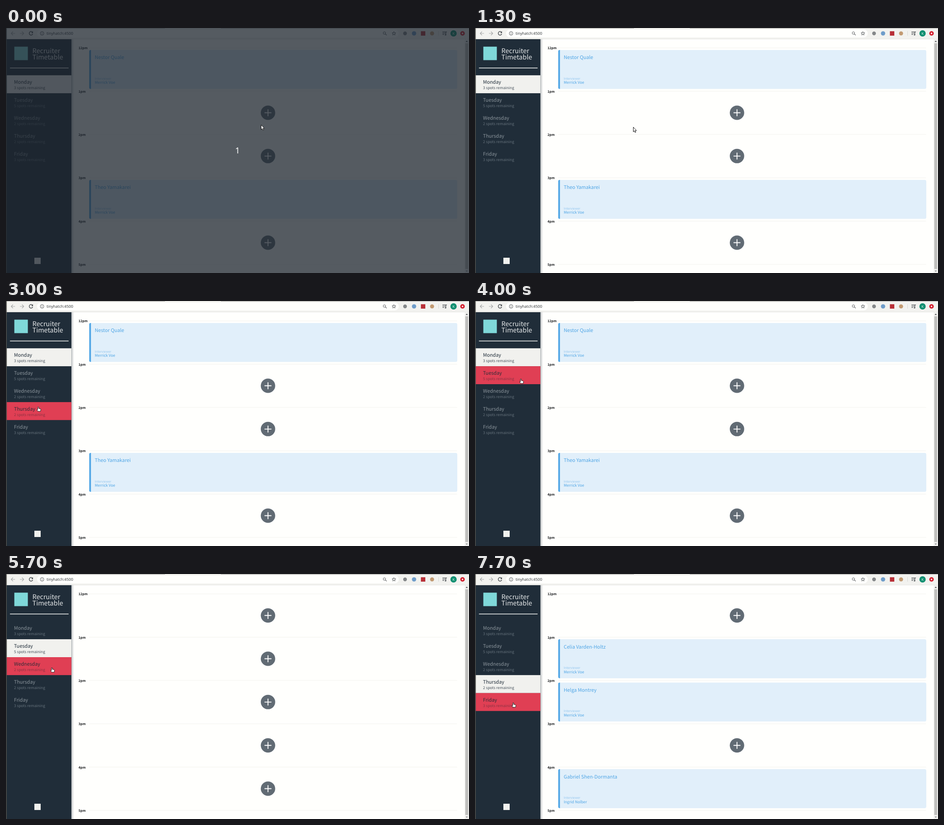
Animation of 1028x545 px, one loop 8000 ms. Source, as an HTML page:

```html
<!DOCTYPE html>
<html lang="en">
<head>
<meta charset="utf-8">
<title>Timetable</title>
<style>
html, body { margin: 0; width: 100%; height: 100%; overflow: hidden; background: #fffffd; }
svg { display: block; width: 100vw; height: 100vh; }
text { font-family: "Noto Sans CJK JP", "Noto Sans CJK SC", "Noto Sans CJK", "Noto Sans", sans-serif; text-rendering: geometricPrecision; white-space: pre; }
.bar { font-family: "Noto Sans", "Open Sans", sans-serif; }
</style>
</head>
<body>
<svg id="stage" viewBox="0 0 1028 545" xmlns="http://www.w3.org/2000/svg"></svg>
<script>
const NS = "http://www.w3.org/2000/svg";
const stage = document.getElementById("stage");
const LOOP = 8000;
const STEP = 100;
// Latin letters in the CJK face are drawn about 12 % larger per em.
const EM = 1 / 1.117;

function add(parent, tag, attrs, content) {
  const node = document.createElementNS(NS, tag);
  for (const key in attrs) node.setAttribute(key, attrs[key]);
  if (content !== undefined) node.textContent = content;
  parent.appendChild(node);
  return node;
}
const group = (parent, attrs = {}) => add(parent, "g", attrs);
const rect = (parent, x, y, width, height, fill, rx = 0) =>
  add(parent, "rect", { x, y, width, height, fill, rx });
const circle = (parent, cx, cy, r, fill) => add(parent, "circle", { cx, cy, r, fill });
const line = (parent, d, stroke, width = 1) =>
  add(parent, "path", { d, stroke, "stroke-width": width, fill: "none" });
const label = (parent, x, y, size, fill, content, weight = 400) =>
  add(parent, "text", { x, y, fill, "font-size": (size * EM).toFixed(2), "font-weight": weight }, content);

const HOUR = 96.33;
const ROW = 39.9;
const SIDE = 145;
const rowTop = i => 105.2 + i * ROW;
const hourY = i => 44.2 + i * HOUR;

const days = [
  ["Monday", 3], ["Tuesday", 5], ["Wednesday", 2], ["Thursday", 2], ["Friday", 3]
];
const bookings = [
  { 0: ["Nestor Quale", "Merrick Voe"], 3: ["Theo Yamakarei", "Merrick Voe"] },
  {},
  { 2: ["Tobin Dargen", "Marabeth Corvin"], 3: ["Auberon Tillers", "Marabeth Corvin"], 4: ["Elio Mardonez", "Arno Delph"] },
  { 1: ["Celia Varden-Holtz", "Merrick Voe"], 2: ["Helga Montrey", "Merrick Voe"], 4: ["Gabriel Shen-Dormanta", "Ingrid Nolber"] }
];

// start time, selected day
const picks = [[0, 0], [4200, 1], [5900, 2], [7100, 3]];

// first step, last step, pointer x and y reached at the last step
const moves = [
  [0, 0, 566, 215], [300, 300, 551, 219], [400, 600, 499, 225],
  [1200, 1200, 120, 200], [1300, 1300, 351, 220],
  [1500, 1500, 124, 206], [1600, 1800, 70, 125],
  [2000, 2200, 60, 181], [2300, 2600, 62, 258], [2800, 2800, 66, 286],
  [3000, 3100, 77, 184], [3300, 3300, 98, 150],
  [3500, 3500, 231, 168], [3600, 3800, 102, 173],
  [4600, 4700, 103, 179], [4900, 5000, 139, 185.6],
  [5200, 5200, 138, 188], [5400, 5700, 102, 208],
  [6000, 6300, 92, 248], [7500, 7700, 85, 286]
];

function pointerAt(t) {
  const now = Math.floor(t / STEP) * STEP;
  let x = 0, y = 0;
  for (const [from, to, endX, endY] of moves) {
    if (now < from) break;
    const p = (Math.min(now, to) - from + STEP) / (to - from + STEP);
    x += (endX - x) * p;
    y += (endY - y) * p;
  }
  return [x, y];
}

function toolbar(g) {
  rect(g, 0, 0, 1028, 24.5, "#f2f2ef");
  rect(g, 0, 0, 1028, 1, "#a3a39f");
  rect(g, 353, 0, 124, 1.2, "#e9e9e6");
  rect(g, 69, 3, 803, 18, "#fffffd", 9);
  rect(g, 0, 24, 1028, .7, "#dcdcd8");
  line(g, "M20 12h-8.5m4-4l-4 4l4 4", "#a5a7a8", 1.2);
  line(g, "M31 12h8.5m-4-4l4 4l-4 4", "#a5a7a8", 1.2);
  line(g, "M58.6 9.2A4 4 0 1 0 59.4 13", "#43474b", 1.4);
  add(g, "path", { d: "M60 7.2v4h-4z", fill: "#43474b" });
  const info = circle(g, 80.1, 12, 4, "none");
  info.setAttribute("stroke", "#56595c");
  line(g, "M80.1 11.4v2.8m0-4.7v1", "#56595c");
  add(g, "text", { x: 90, y: 15.1, "font-size": 8.5, fill: "#34383c", class: "bar" }, "tinyhatch:4500");
  const lens = circle(g, 840.2, 11.2, 2.7, "none");
  lens.setAttribute("stroke", "#55585c");
  line(g, "M842.2 13.2l3 3", "#55585c", 1.2);
  let star = "";
  for (let i = 0; i < 10; i++) {
    const r = i % 2 ? 1.9 : 4.3, a = (i / 5 - .5) * Math.PI;
    star += (i ? "L" : "M") + (861.3 + r * Math.cos(a)).toFixed(2) + " " + (12.2 + r * Math.sin(a)).toFixed(2);
  }
  line(g, star + "Z", "#4b4f53");
  circle(g, 886, 12, 4.2, "#85888a");
  circle(g, 906, 12, 4.8, "#6f9dca");
  rect(g, 921.2, 7.2, 9.8, 9.8, "#b83038");
  circle(g, 946, 12, 4.5, "#c29a72");
  rect(g, 960, 7, .8, 10, "#cfcfcc");
  line(g, "M969 8.7h7m-7 2.8h7m-7 2.8h4m3.6.7v-6.3h2.4", "#4b4f53", 1.2);
  circle(g, 976, 15, 1.6, "#4b4f53");
  circle(g, 993.7, 12, 7, "#0f8f71");
  add(g, "text", { x: 993.7, y: 14.7, "font-size": 7.4, fill: "#eefaf5", "text-anchor": "middle", class: "bar" }, "K");
  circle(g, 1013.6, 12, 5, "#d3202f");
  circle(g, 1013.6, 12, 1.7, "#fff");
}

function scrollbar(g) {
  rect(g, 1018.5, 24.5, 9.5, 521, "#f0f0ee");
  rect(g, 1019.8, 34, 6.4, 502, "#bfbfbd");
  add(g, "path", { d: "M1020.6 31l2.4-3l2.4 3z", fill: "#55585a" });
  add(g, "path", { d: "M1020.6 539.5l2.4 3l2.4-3z", fill: "#8c8e8f" });
}

function card(parent, y, [guest, host]) {
  const g = group(parent, { "clip-path": "url(#round)", transform: `translate(184.6 ${y + 4.5})` });
  rect(g, 0, 0, 817.4, 87, "#e1effa");
  rect(g, 0, 0, 4, 87, "#4ea5e5");
  label(g, 12.4, 20.5, 12.06, "#4ea5e5", guest);
  label(g, 12.4, 66, 7.7, "#93c6ee", "Interviewer");
  label(g, 12.4, 75.6, 9.38, "#4ea5e5", host);
}

function plus(parent, y) {
  const g = group(parent, { transform: `translate(581.7 ${y + 48})` });
  circle(g, 0, 0, 16, "#616b74");
  line(g, "M-7.7 0h15.4M0-7.7v15.4", "#fff", 1.9);
}

const defs = add(stage, "defs", {});
rect(add(defs, "clipPath", { id: "round" }), 0, 0, 817.4, 87, "#000", 4);
const fade = add(defs, "linearGradient", { id: "fade" });
add(fade, "stop", { offset: 0, "stop-color": "#202d39", "stop-opacity": .28 });
add(fade, "stop", { offset: 1, "stop-color": "#202d39", "stop-opacity": 0 });

rect(stage, 0, 0, 1028, 545, "#fffffd");
for (let i = 0; i < 6; i++) {
  label(stage, 161, hourY(i) + 3.2, 8.1, "#17191b", (i || 12) + "pm", 700);
  rect(stage, 184.5, hourY(i) - .4, 817, .8, "#eeeeea");
}
const pages = bookings.map(list => {
  const page = group(stage);
  for (let i = 0; i < 5; i++) list[i] ? card(page, hourY(i), list[i]) : plus(page, hourY(i));
  return page;
});

rect(stage, SIDE, 24.5, 6, 521, "url(#fade)");
rect(stage, 0, 24.5, SIDE + .2, 521, "#202d39");
rect(stage, 18.5, 41.5, 30, 30, "#7fd8d9");
label(stage, 58.5, 56, 16.2, "#e6e9ea", "Recruiter", 300);
label(stage, 58.5, 69.8, 16.2, "#e6e9ea", "Timetable", 300);
rect(stage, 8.8, 88.2, 130.2, 1.5, "#f4f5f3");
rect(stage, 63, 511, 14, 14, "#f1f1ee");

const rows = days.map(([name, spots], i) => {
  const y = rowTop(i);
  return {
    back: rect(stage, 1.5, y, 143.7, ROW, "none"),
    name: label(stage, 17.7, y + 19.2, 12.06, "#000", name),
    spots: label(stage, 17.7, y + 30.8, 9.38, "#000", spots + " spots remaining", 300)
  };
});
const looks = {
  plain: ["none", "#8b959c", "#66727c"],
  hover: ["#e03f54", "#302c38", "#8c3344"],
  picked: ["#f1f1ee", "#202d39", "#46505a"]
};

toolbar(stage);
scrollbar(stage);
rect(stage, 0, 0, 1.6, 545, "#4d4c48");

const veil = group(stage);
rect(veil, 0, 0, 1028, 545, "rgba(29,37,46,.75)");
add(veil, "text", { x: 514, y: 279.3, "font-size": 18.5, fill: "#fff", "text-anchor": "middle", class: "bar" }, "1");

const shape = { stroke: "#111", fill: "#fff", "stroke-linejoin": "round" };
const arrow = add(stage, "path", {
  ...shape, d: "M.5.5V11l2.3-2.2l1.6 3.7l1.7-.8l-1.6-3.5h3.1z"
});
const hand = add(stage, "path", {
  ...shape, "stroke-width": .9,
  d: "M-1 .9q1-1.1 2 0v3.1l3.6.7q1.2.3 1.1 1.5l-.6 4.2h-5.6l-2.5-3.4q.4-1.6 2-.4z"
});

const show = (node, on) => node.setAttribute("visibility", on ? "visible" : "hidden");

function draw(t) {
  const picked = picks.filter(([from]) => from <= t).pop()[1];
  const [x, y] = pointerAt(t);
  const hover = x < SIDE ? Math.floor((y - rowTop(0)) / ROW) : -1;
  pages.forEach((page, i) => show(page, i === picked));
  rows.forEach((row, i) => {
    const look = looks[i === picked ? "picked" : i === hover ? "hover" : "plain"];
    ["back", "name", "spots"].forEach((part, k) => row[part].setAttribute("fill", look[k]));
  });
  show(veil, t < 300);
  show(arrow, hover < 0);
  show(hand, hover >= 0);
  (hover < 0 ? arrow : hand).setAttribute("transform", `translate(${x} ${y})`);
}

const start = performance.now();
function tick() {
  draw((performance.now() - start) % LOOP);
  requestAnimationFrame(tick);
}
tick();
</script>
</body>
</html>
```
